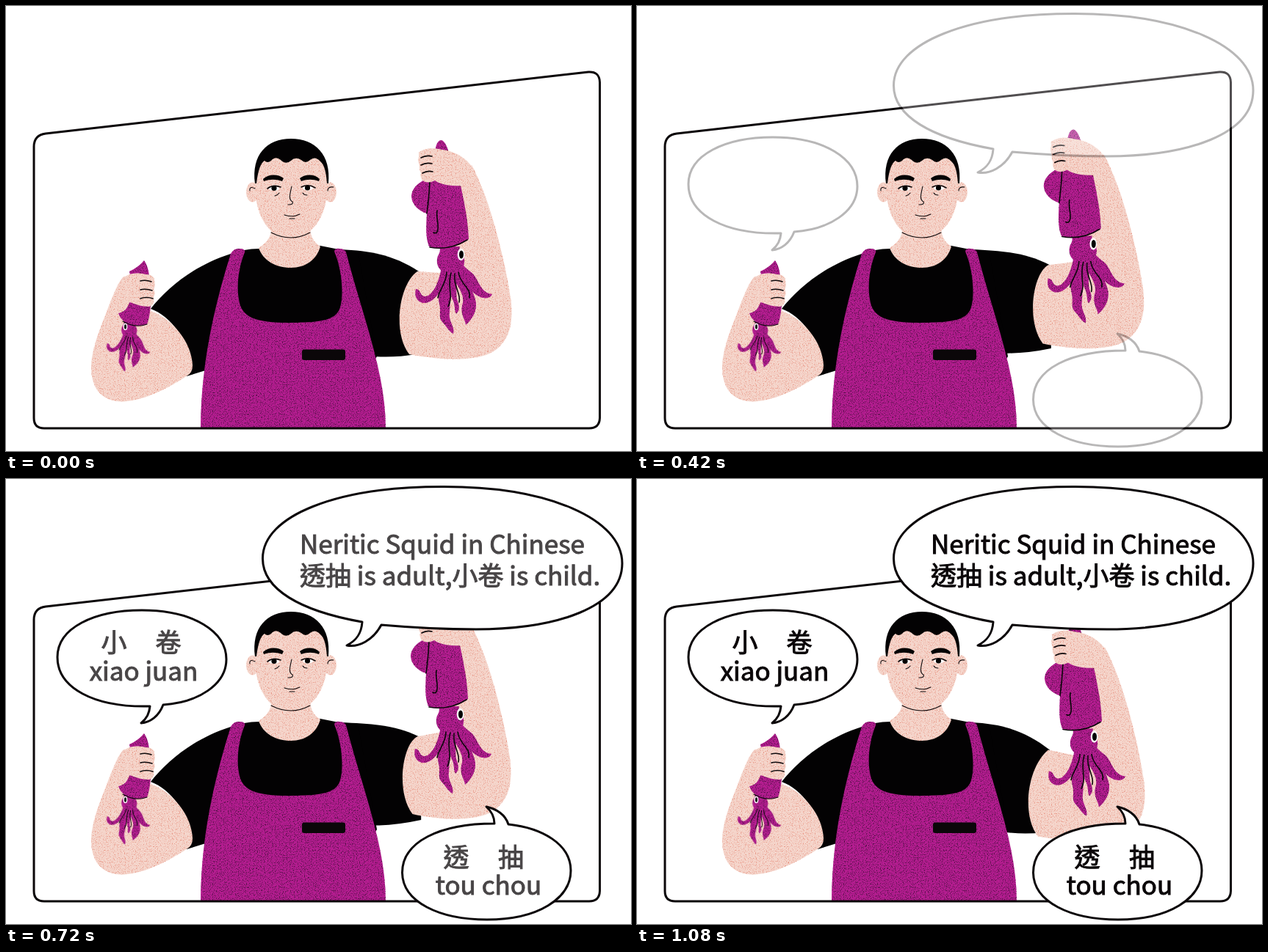
Recreate the animation shown at these times as an HTML page. Size 851x607 px, loop 2640 ms.

```html
<!DOCTYPE html>
<html lang="en">
<head>
<meta charset="utf-8">
<title>Neritic squid</title>
<style>
  html, body { margin: 0; width: 100%; height: 100%; overflow: hidden; background: #fff; }
  svg { display: block; width: 851px; height: 607px; }
  .skin { fill: #f5d6cc; }
  .purple { fill: #b41d90; }
  .line { fill: none; stroke: #0b0709; stroke-width: 1.6; stroke-linecap: round; stroke-linejoin: round; }
  .thin { stroke-width: 1.1; }
  .outline { stroke: #0b0709; stroke-width: 3; stroke-linejoin: round; }
  text { font: 35px "Noto Sans CJK TC", "Noto Sans CJK JP", "Noto Sans CJK SC", "Noto Sans CJK", sans-serif;
         fill: #0b0709; stroke: #0b0709; stroke-width: 1px; }
  .mid { text-anchor: middle; }
</style>
</head>
<body>
<svg viewBox="0 0 851 607">
  <defs>
    <filter id="skinGrain" x="0" y="0" width="1" height="1" color-interpolation-filters="sRGB">
      <feTurbulence type="fractalNoise" baseFrequency=".8" numOctaves="2" seed="4"/>
      <feColorMatrix values="0 0 0 0 .9  0 0 0 0 .55  0 0 0 0 .48  3.5 0 0 0 -1.85"/>
      <feComposite in2="SourceGraphic" operator="in" result="grain"/>
      <feMerge><feMergeNode in="SourceGraphic"/><feMergeNode in="grain"/></feMerge>
    </filter>
    <filter id="inkGrain" x="0" y="0" width="1" height="1" color-interpolation-filters="sRGB">
      <feTurbulence type="fractalNoise" baseFrequency=".8" numOctaves="2" seed="9"/>
      <feColorMatrix values="0 0 0 0 .29  0 0 0 0 .06  0 0 0 0 .25  4 0 0 0 -2.05"/>
      <feComposite in2="SourceGraphic" operator="in" result="grain"/>
      <feMerge><feMergeNode in="SourceGraphic"/><feMergeNode in="grain"/></feMerge>
    </filter>
    <g id="tentacles">
      <g class="purple" filter="url(#inkGrain)">
        <path d="M590 328L618 328C616 335 623 338 624 346C625 354 621 360 614 364H597C589 360 586 352 587 345C588 338 593 336 590 328Z"/>
        <path d="M593 355C590 378 580 396 571 396C563 396 566 387 558 386C555 398 562 406 572 405C586 402 594 386 604 364Z"/>
        <path d="M595 358C597 376 586 390 590 406C593 418 588 424 594 431C600 437 603 444 609 447C612 438 602 430 604 418C606 400 603 385 612 362Z"/>
        <path d="M602 360C609 376 603 390 608 400C612 408 610 414 613 420C619 414 617 408 614 400C612 388 615 376 614 360Z"/>
        <path d="M606 358C610 380 625 390 622 405C617 420 626 428 626 435C634 428 641 418 640 405C638 390 628 380 622 358Z"/>
        <path d="M610 354C625 368 628 390 646 397C654 400 660 398 662 393C650 392 646 382 641 373C635 361 628 362 620 350Z"/>
      </g>
      <path class="line" d="M600 363C600 378 590 386 588 398M606 364C600 384 610 394 602 410M611 365C609 384 620 392 617 404M616 363C618 380 634 384 631 398"/>
    </g>
  </defs>

  <!-- shirt and neck -->
  <path id="sleeve" fill="#030203"/>
  <path fill="#030203" d="M345 331C330 331 318 334 306 338C256 354 220 384 197 413C230 425 258 470 246 505L275 496L320 540H470L505 478L480 338Q455 332 428 327Z"/>
  <g class="skin" filter="url(#skinGrain)">
    <path d="M362 295C363 314 356 322 344 330C350 347 367 357 388 357C408 357 423 346 428 328C418 322 413 312 414 295Z"/>
    <ellipse cx="335.500" cy="254" rx="8.500" ry="13.500"/>
    <ellipse cx="441.500" cy="254" rx="8.500" ry="13.500"/>
    <path d="M339 230C339 205 360 192 388 192S438 205 438 230C440 262 432 288 420 301C410 312 400 317 388 317S364 312 355 300C344 286 337 262 339 230Z"/>
  </g>
  <path fill="#030203" d="M339 242C334 203 355 181 388 181S443 203 439 242H437C436 228 434 217 428 212Q421 204 414 210Q408 216 402 210Q394 205 388 211Q381 217 374 210Q367 204 361 211Q356 215 352 211Q344 216 341 242Z"/>

  <!-- face -->
  <path fill="#030203" d="M350 236C358 229 370 229 378 235L376 239C367 236 360 236 351 239ZM400 235C408 229 420 229 427 236L426 239C418 236 410 236 402 239Z"/>
  <g fill="#fff"><ellipse cx="365" cy="249" rx="7" ry="3"/><ellipse cx="411" cy="248.500" rx="7" ry="3"/></g>
  <circle cx="365" cy="248.500" r="3.600"/><circle cx="410.500" cy="248" r="3.600"/>
  <path class="line" d="M356 249Q364 243 374 247M402 247Q412 242 421 248"/>
  <path class="line thin" d="M366 259Q370 258 372 255M404 255Q406 258 410 258M389 246C387 255 384 264 390 267Q392 271 384 271M379 285Q390 289 400 284M386 290H393M361 309Q388 323 414 309M332 252Q331 245 339 249M438 252Q438 246 446 247"/>

  <!-- apron -->
  <path class="purple" filter="url(#inkGrain)" d="M306 338Q310 330 318 331Q326 331 325 336C318 352 313 380 317 400C320 425 340 432 385 432C428 432 450 429 455 411C460 395 458 360 447 335Q448 330 454 331Q461 331 463 336C486 425 517 500 517 576H265C265 500 280 420 306 338Z"/>
  <rect x="403" y="468.500" width="59" height="14.500" rx="3" fill="#0b0709"/>

  <!-- small squid arm -->
  <path class="skin" filter="url(#skinGrain)" d="M160 369C150 380 142 405 134 425C122 455 116 475 116 495C117 525 133 540 160 539.500C190 538 225 519 247 504Q254 500 254 490C253 460 228 427 197 416L195 380Z"/>
  <path class="purple" filter="url(#inkGrain)" d="M168 362Q181 356 188 347Q194 355 195 370L170 372Z"/>
  <use href="#tentacles" transform="translate(138 460) rotate(8) scale(.57) translate(-558 -386)"/>
  <path class="purple" filter="url(#inkGrain)" d="M169 402C165 414 160 418 153 419C156 428 162 431 166 433Q178 439 192 434Q196 424 197 406Z"/>
  <path class="line thin" d="M159 430Q176 440 192 434"/>
  <ellipse cx="162.500" cy="437.500" rx="2.800" ry="4.800" fill="#fff"/>
  <ellipse cx="162.500" cy="437.500" rx="1.500" ry="3.300"/>
  <path class="skin" filter="url(#skinGrain)" d="M155 377C163 364 176 363 190 366Q202 366 202 375Q204 381 201 386Q204 392 201 397Q203 408 195 410C184 410 178 407 168 404Q158 410 150 418Z"/>
  <path class="line" d="M183 375Q190 373 198 376M183 387Q190 385 199 388M183 399Q191 396 200 399"/>

  <!-- big squid arm -->
  <g id="bigArm">
    <path id="forearm" class="skin" filter="url(#skinGrain)"/>
    <path class="purple" filter="url(#inkGrain)" d="M584 197Q587 183 592 183Q598 183 603 200Z"/>
    <use href="#tentacles"/>
    <path class="purple" filter="url(#inkGrain)" d="M570 237C560 242 552 250 552 260C553 272 563 280 573 283C572 300 571 316 576 328C594 334 615 329 630 318C629 292 624 268 618 240Z"/>
    <path class="line" d="M577 239Q576 262 573 283M587 279C585 290 591 301 587 308Q585 311 582 309M577 329Q604 334 628 319"/>
    <ellipse cx="619.500" cy="339" rx="4.800" ry="8.200" fill="#fff"/>
    <ellipse cx="620" cy="339" rx="3" ry="5.500"/>
    <path class="skin" filter="url(#skinGrain)" d="M562 200C568 194 582 193 594 196C612 198 628 208 636 222L628 245C610 246 594 245 584 238Q574 243 567 238Q563 232 565 228Q562 222 563 217Q560 210 562 206Z"/>
    <path class="line" d="M565 207Q572 203 580 205M565 217Q572 213 580 215M567 228Q574 224 581 226"/>
  </g>

  <path class="outline" fill="none" d="M38 192Q38 176 54 174L793 90Q808 89 808.500 104V562Q808 576 794 576H52Q38 576 38 562Z"/>

  <g id="bubbles" class="outline" fill="#fff">
    <path d="M485 195C400 180 349 150 349.500 108C350 50 450 10.500 594 10.500C740 10 839 55 839 115C839 175 750 205 640 205C590 205 545 202 511 199C500 220 480 230 464 227C478 220 484 210 485 195Z"/>
    <path d="M196 310C120 312 70 285 70 243C70 203 120 179 185 179C255 179 300 208 300 246C300 280 262 305 214 308C208 324 196 332 184 333C192 326 195 320 196 310Z"/>
    <path d="M665 470C590 470 539.500 495 539.500 537C540 577 590 601 655 601C725 601 769 572 769 534C769 498 730 476 684 471C680 458 668 450 654 447C663 455 665 462 665 470Z"/>
  </g>
  <g id="words">
    <text x="400" y="102">Neritic Squid in Chinese</text>
    <text x="400" y="145">透抽 is adult,小卷 is child.</text>
    <text x="129.500 203.500" y="236">小卷</text>
    <text class="mid" x="187.500" y="275">xiao juan</text>
    <text x="595.500 670" y="529">透抽</text>
    <text class="mid" x="657" y="567">tou chou</text>
  </g>
</svg>
<script>
  const LOOP = 2640, STEP = 60, REST = 1080;
  // time, x and y of the raised arm
  const swing = [
    [0, 0, 0], [150, 1, -16], [300, 1, 2], [480, 2, -20], [600, 2.5, 2],
    [720, -1, -18], [840, -.5, 9.5], [960, 1, -14], [1080, 3, 12.5]
  ];
  const byId = id => document.getElementById(id);
  const [sleeve, forearm, bigArm, bubbles, words] =
    ['sleeve', 'forearm', 'bigArm', 'bubbles', 'words'].map(byId);
  const ramp = (t, from, to) => Math.min(1, Math.max(0, (t - from) / (to - from)));

  function armOffset(t) {
    const i = Math.max(1, swing.findIndex(key => key[0] >= t));
    const [t0, x0, y0] = swing[i - 1], [t1, x1, y1] = swing[i];
    const k = (1 - Math.cos(Math.PI * ramp(t, t0, t1))) / 2;
    return [x0 + (x1 - x0) * k, y0 + (y1 - y0) * k];
  }

  function draw(t) {
    const [x, y] = armOffset(t);
    bigArm.setAttribute('transform', `translate(${x} ${y})`);
    // the shoulder follows the hand only in part
    sleeve.setAttribute('d', `M455 332C500 334 530 ${341 + .3 * y} 562 ${362 + .6 * y}L565 420
      L${558 - .4 * y} ${475 + .55 * y}Q530 ${480 + .4 * y} 500 ${478 + .3 * y}L440 460Z`);
    const cuff = -.25 * y - x;
    forearm.setAttribute('d', `M${560 - x} ${362 - .4 * y}C${535 + cuff} 380 ${526 + cuff} 445 ${549 + cuff} 475
      C590 483 640 486 664 471C688 455 691 428 687 398C680 350 660 265 634 217L617 240
      L604 300V360L590 364Z`);
    bubbles.setAttribute('opacity', ramp(t, 300, 720));
    words.setAttribute('opacity', ramp(t, 545, 780));
  }

  function tick(now) {
    const t = now % LOOP;
    draw(Math.min(REST, Math.floor(t / STEP) * STEP));
    requestAnimationFrame(tick);
  }
  draw(0);
  requestAnimationFrame(tick);
</script>
</body>
</html>
```
